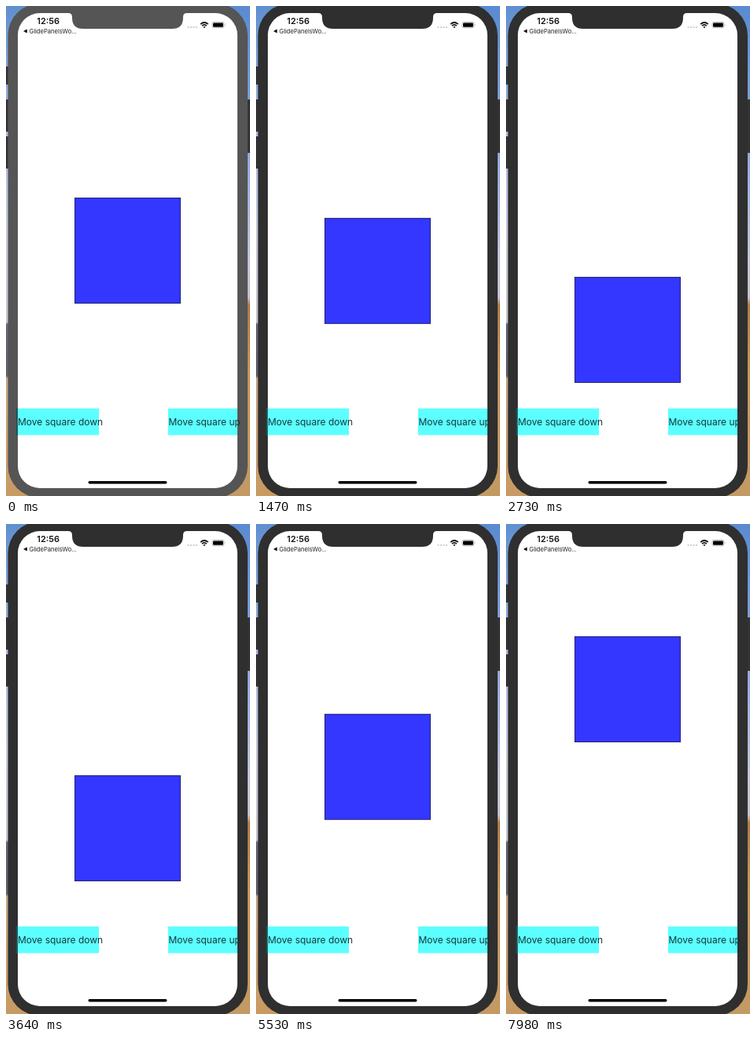
Recreate the animation shown at these times as an HTML page. Size 310 by 624 pixels, loop 8000 ms.

```html
<!DOCTYPE html>
<html lang="en">
<head>
<meta charset="utf-8">
<title>Moving square</title>
<style>
  html, body { margin: 0; width: 100%; height: 100%; overflow: hidden; }
  svg { display: block; width: 310px; height: 624px; }
  text { font-family: Inter, Roboto, sans-serif; }

  .case { animation: focus 8s step-end infinite; }
  .square { animation: travel 8s ease-in-out infinite; }

  @keyframes focus {
    0% { fill: #555; }
    .875%, 100% { fill: #2f2f2f; }
  }
  /* Three two-second moves: down, up, up */
  @keyframes travel {
    0%, 9.625% { transform: translateY(0); }
    34.625%, 36.9% { transform: translateY(101px); }
    61.9%, 66.5% { transform: translateY(0); }
    91.5%, 100% { transform: translateY(-101px); }
  }
</style>
</head>
<body>
<svg viewBox="0 0 310 624">
  <defs>
    <linearGradient id="left" x2="0" y2="1">
      <stop offset="0" stop-color="#5f8fd0"/>
      <stop offset=".25" stop-color="#a9bbe0"/>
      <stop offset=".45" stop-color="#c6cbdc"/>
      <stop offset=".645" stop-color="#c9c8d0"/>
      <stop offset=".65" stop-color="#68687a"/>
      <stop offset=".755" stop-color="#62606c"/>
      <stop offset=".76" stop-color="#c8a888"/>
      <stop offset="1" stop-color="#c89a62"/>
    </linearGradient>
    <linearGradient id="right" x2="0" y2="1">
      <stop offset="0" stop-color="#5b8ad0"/>
      <stop offset=".3" stop-color="#8fa9dc"/>
      <stop offset=".52" stop-color="#c2c4dc"/>
      <stop offset=".595" stop-color="#c4bfce"/>
      <stop offset=".61" stop-color="#b07c48"/>
      <stop offset=".75" stop-color="#c8985c"/>
      <stop offset="1" stop-color="#c39a64"/>
    </linearGradient>
  </defs>

  <!-- Desktop and side buttons -->
  <rect width="155" height="624" fill="url(#left)"/>
  <rect x="155" width="155" height="624" fill="url(#right)"/>
  <path d="M0 77h4v23H0zM0 119h4v41H0zM0 166h4v41H0zM306 119h4v68h-4z" fill="#333"/>

  <!-- Phone -->
  <rect class="case" x="2.5" y="-3" width="304.5" height="629" rx="40"/>
  <rect x="15" y="9" width="279" height="605" rx="28" fill="#fff"/>
  <path class="case" d="M79 8.5V9q5 0 5 5v1q0 14 14 14h113q14 0 14-14v-1q0-5 5-5v-.5z"/>

  <!-- Status bar -->
  <text x="39.3" y="23.3" font-size="11" font-weight="600" fill="#111">12:56</text>
  <path d="M22 32l4.8-2.4v4.8z" fill="#111"/>
  <text x="29.5" y="34.8" font-size="7.6" fill="#222">GlidePanelsWo...</text>
  <path d="M230.5 27h13" stroke="#c4c4c4" stroke-width="1.6" stroke-dasharray="2.2 1.3"/>
  <g fill="none" stroke="#111" stroke-width="1.7">
    <path d="M247.2 23.2q4.8-4.4 9.6 0M249 25.2q3-2.7 6 0"/>
  </g>
  <path d="M250.4 26.5q1.6-1.2 3.2 0L252 28.2z" fill="#111"/>
  <rect x="261.9" y="20.4" width="15.2" height="7.4" rx="2.1" fill="none" stroke="#aaa" stroke-width=".8"/>
  <rect x="263" y="21.5" width="13" height="5.2" rx="1.2" fill="#000"/>
  <path d="M278.2 22.8q1.2 1.3 0 2.6z" fill="#aaa"/>

  <rect class="square" x="87.5" y="244.5" width="134" height="134" fill="#3337ff" stroke="#23236e"/>

  <!-- Controls -->
  <path d="M13 512h2v35h-2z" fill="#1f5557"/>
  <path d="M15 512.5h103v34H15zM206 512.5h88v34h-88z" fill="#5cffff"/>
  <g font-size="12" fill="#15393c">
    <text x="15" y="534">Move square down</text>
    <text x="206.5" y="534">Move square up</text>
  </g>
  <rect x="104.5" y="605" width="100" height="3.4" rx="1.7" fill="#000"/>
</svg>
</body>
</html>
```
